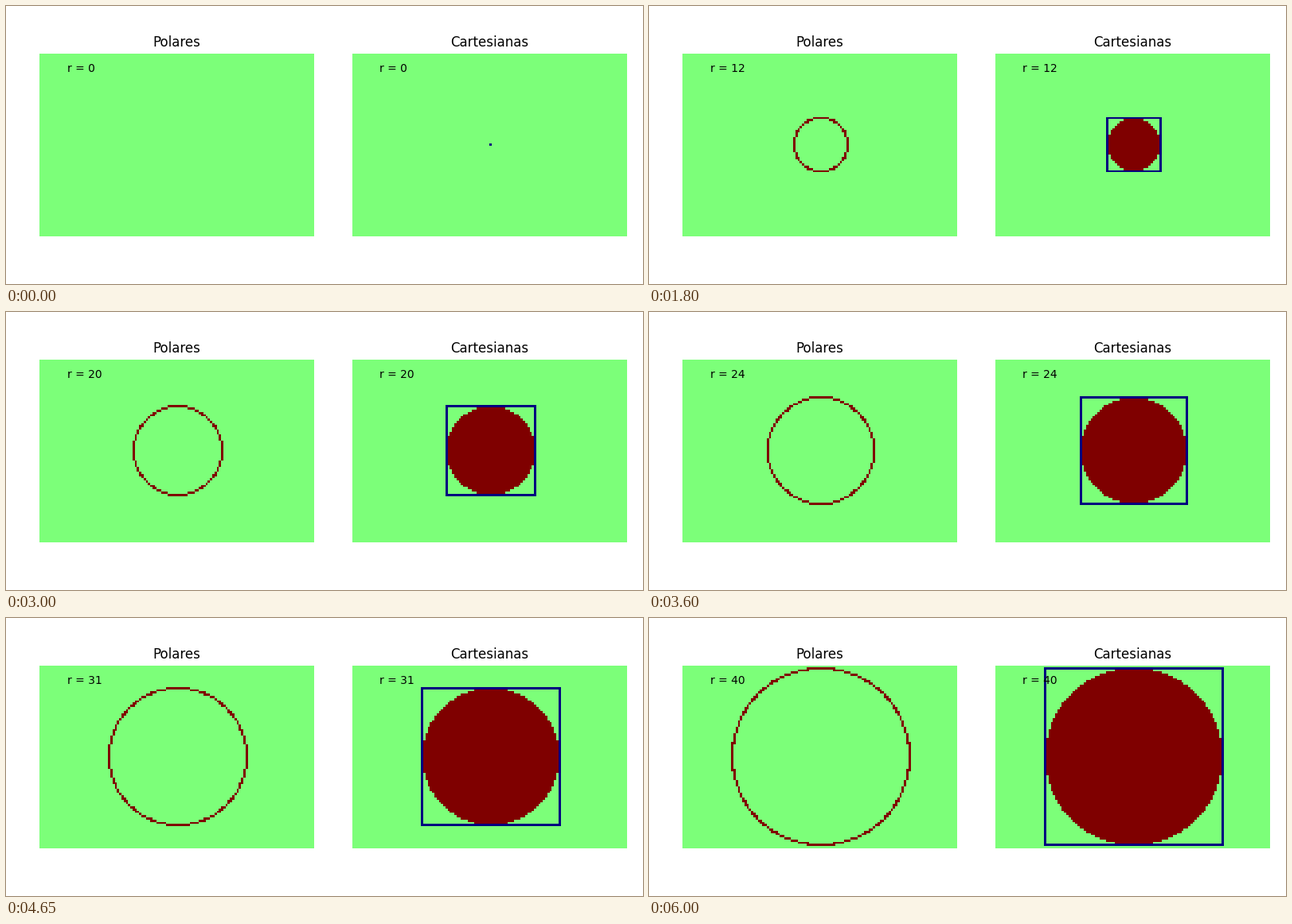
A matplotlib script that plays this animation: 800 px wide and 350 px high, repeating every 6.15 s.

```python
import numpy as np
import matplotlib.pyplot as plt
from matplotlib.animation import FuncAnimation

WIDTH, HEIGHT = 124, 83
CX, CY = WIDTH // 2, HEIGHT // 2
MAX_RADIUS = 40

plt.rcParams["font.family"] = "DejaVu Sans"


def polar_grid(r):
    """Circle outline: a quadrant sampled by angle and mirrored."""
    grid = np.zeros((HEIGHT, WIDTH))
    theta = np.linspace(0, np.pi / 2, 2 * r)
    dx = np.rint(r * np.cos(theta)).astype(int)
    dy = np.rint(r * np.sin(theta)).astype(int)
    for sx in (-1, 1):
        for sy in (-1, 1):
            grid[CY + sy * dy, CX + sx * dx] = 1
    return grid


def cartesian_grid(r):
    """Disk found by testing every cell of its bounding square."""
    y, x = np.ogrid[:HEIGHT, :WIDTH]
    dx, dy = abs(x - CX), abs(y - CY)
    grid = np.where(dx**2 + dy**2 <= r**2, 1.0, 0.0)
    grid[np.maximum(dx, dy) == r] = -1
    return grid


fig, axes = plt.subplots(1, 2, figsize=(8, 3.5), dpi=100)
panels = []
for ax, title, make_grid in zip(
    axes, ("Polares", "Cartesianas"), (polar_grid, cartesian_grid)
):
    image = ax.imshow(
        make_grid(0), cmap="jet", vmin=-1, vmax=1, interpolation="nearest"
    )
    ax.set_xticks(range(0, WIDTH, 20))
    ax.set_yticks(range(0, HEIGHT, 20))
    ax.set_title(title, fontsize=12)
    label = ax.text(0.1, 0.9, "r = 0", transform=ax.transAxes, fontsize=10)
    panels.append((image, label, make_grid))

# Leave room for the tick labels before hiding them.
fig.tight_layout()
for ax in axes:
    ax.axis("off")


def update(r):
    artists = []
    for image, label, make_grid in panels:
        image.set_data(make_grid(r))
        label.set_text(f"r = {r}")
        artists += [image, label]
    return artists


anim = FuncAnimation(
    fig, update, frames=MAX_RADIUS + 1, interval=150, repeat=True, repeat_delay=0
)
plt.show()
```
